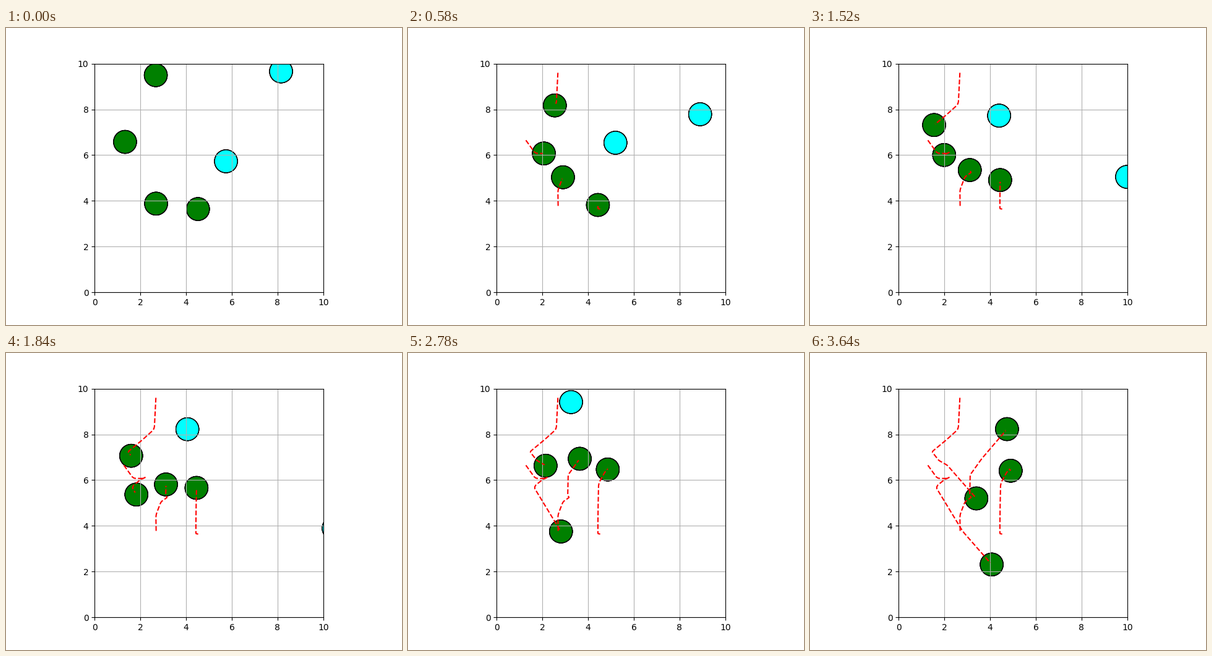
Recreate the animation shown at these times as a matplotlib script. Size 640x480 px, loop 3660 ms.

```python
import numpy as np
import matplotlib.pyplot as plt
from matplotlib.animation import FuncAnimation

TICK_MS = 20
TICKS = 183
STEPS = 80
RADIUS = 0.5
RIM_LAYERS = 4


def glide(step, value):
    """Move evenly from key to key, with slightly rounded turns."""
    path = np.interp(np.arange(STEPS), step, value)
    path[1:-1] = np.convolve(path, np.ones(3) / 3, "valid")
    return path


class Robot:
    """A disc that passes (step, x, y) keys and leaves a dashed trail."""

    def __init__(self, *keys):
        step, x, y = zip(*keys)
        self.path = np.array([glide(step, x), glide(step, y)])

    def place(self, k):
        return self.path[:, k + 1]

    def trail(self, k):
        return self.path[:, :k + 1]


class Obstacle:
    """A disc that drifts in a straight line."""

    def __init__(self, start, velocity):
        self.start = np.array(start)
        self.velocity = np.array(velocity)

    def place(self, k):
        return self.start + k * self.velocity


robots = [
    Robot((0, 2.68, 9.6), (13, 2.61, 8.23), (21, 2.1, 7.77), (35, 1.46, 7.24),
          (48, 1.76, 6.86), (60, 2.13, 6.65), (79, 3.4, 5.2)),
    Robot((0, 1.28, 6.65), (8, 1.69, 6.08), (14, 2.08, 6.07), (20, 2.22, 6.12),
          (33, 2.02, 6.03), (37, 1.62, 5.71), (60, 2.81, 3.75), (79, 4.07, 2.31)),
    Robot((0, 2.69, 3.78), (7, 2.68, 4.47), (14, 2.9, 5.05), (21, 3.17, 5.24),
          (33, 3.11, 5.33), (48, 3.13, 6.23), (60, 3.63, 6.93), (79, 4.74, 8.23)),
    Robot((0, 4.53, 3.64), (10, 4.43, 3.66), (21, 4.43, 4.1), (33, 4.44, 4.9),
          (43, 4.46, 5.85), (48, 4.72, 6.33), (55, 4.85, 6.48), (79, 4.9, 6.41)),
]
obstacles = [Obstacle((5.745, 5.73), (-0.0422, 0.0624)),
             Obstacle((8.152, 9.66), (0.0575, -0.1441))]

fig, ax = plt.subplots(figsize=(6.4, 4.8), dpi=100)
ax.set_aspect("equal")
ax.set_xlim(0, 10)
ax.set_ylim(0, 10)
ax.grid(True)


def add_discs(color):
    # Stacked discs give the hard dark rim.
    return [ax.add_patch(plt.Circle((0, 0), RADIUS, fc=color, ec="black"))
            for _ in range(RIM_LAYERS)]


bodies = [(r, add_discs("green")) for r in robots]
bodies += [(o, add_discs("cyan")) for o in obstacles]
trails = [(r, ax.plot([], [], "r--")[0]) for r in robots]


def step_at(tick):
    """Three steps every seven ticks; one of them is held for five ticks."""
    cycle, part = divmod(tick + 1, 7)
    return 3 * cycle + min(part, 2) - 1


def update(tick):
    k = step_at(tick)
    for body, discs in bodies:
        for disc in discs:
            disc.center = body.place(k)
    for robot, line in trails:
        line.set_data(*robot.trail(k))
    return []


anim = FuncAnimation(fig, update, frames=TICKS, interval=TICK_MS,
                     init_func=lambda: update(0), repeat=True, repeat_delay=0)
plt.show()
```
